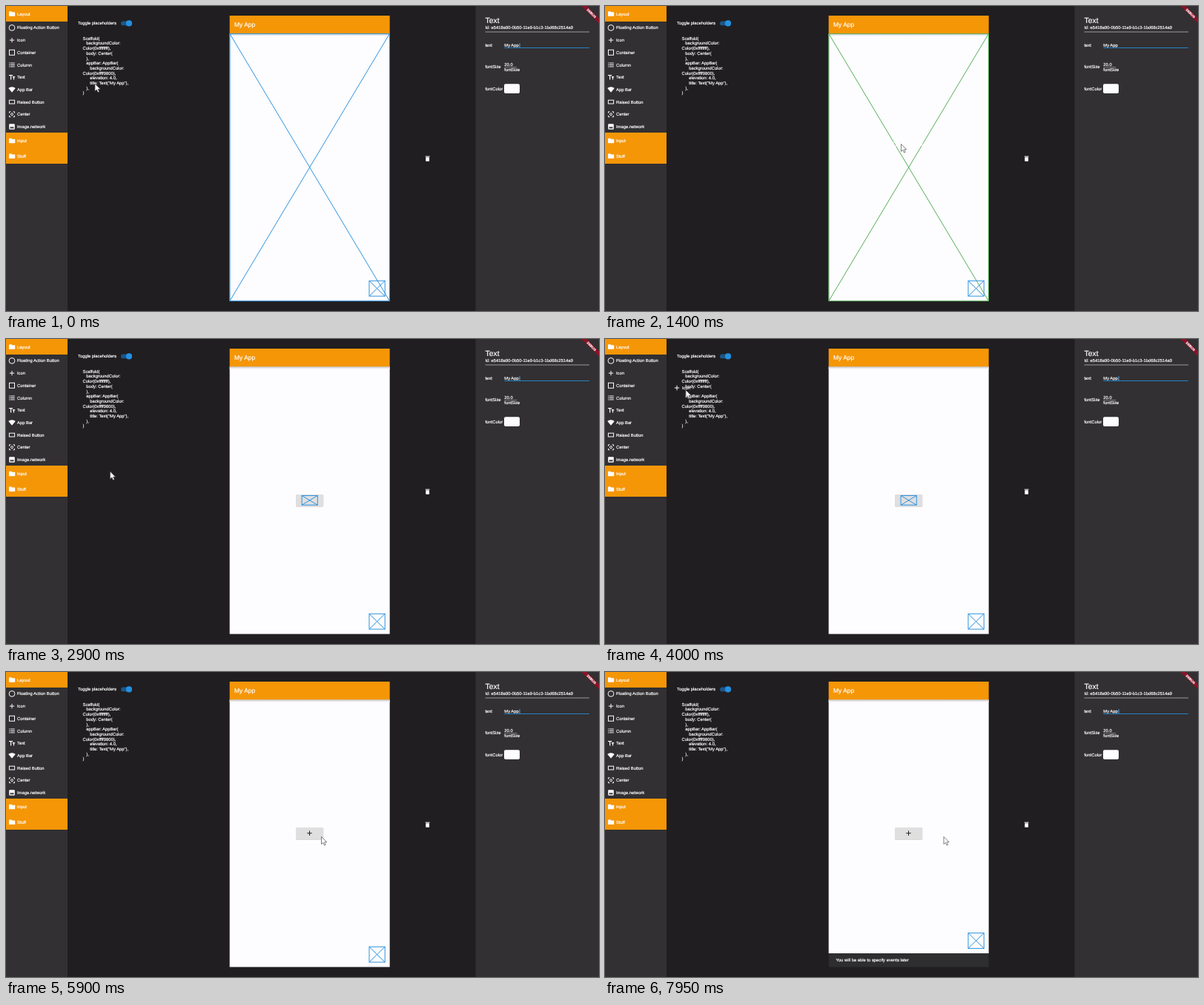
These frames come from a looping animation (800x412 px, 8000 ms). An HTML page with a canvas:

```html
<!DOCTYPE html>
<html lang="en">
<head>
<meta charset="utf-8">
<title>App builder</title>
<style>
  html, body { margin: 0; height: 100%; overflow: hidden; background: #201e20; }
  canvas { display: block; }
</style>
</head>
<body>
<canvas id="stage" width="800" height="412"></canvas>
<script>
const c = document.getElementById('stage').getContext('2d');
const LOOP = 8000, TICK = 50, BLINK = 495;
const WHITE = '#fdfcfe', PANEL = '#323032', BACK = '#201e20', ORANGE = '#f59607',
      BLUE = '#2b93e0', GREEN = '#55ae59', GREY = '#9a989a', SNACK = '#2e2d2f';
const PHONE = { left: 301.7, right: 517.7, top: 13, body: 37.3, bottom: 398.6 };
const MID = { x: (PHONE.left + PHONE.right) / 2, y: (PHONE.body + PHONE.bottom) / 2 };

const ITEMS = [
  ['fab', 'Floating Action Button'], ['icon', 'Icon'], ['container', 'Container'],
  ['column', 'Column'], ['text', 'Text'], ['appBar', 'App Bar'],
  ['button', 'Raised Button'], ['center', 'Center'], ['image', 'Image.network']
];
const rowY = i => 29.4 + i * 16.7;

const CODE = `Scaffold(
   backgroundColor:
Color(0xffffffff),
   body: Center(
   ),
   appBar: AppBar(
      backgroundColor:
Color(0xffff9800),
      elevation: 4.0,
      title: Text("My App"),
   ),
)`.split('\n');

// Pointer moves: start, end, x, y, downward sag on the way
const START = { x: 120, y: 105 };
const MOVES = [
  [0, 850, 18, rowY(6), 165],
  [900, 1400, 399.5, 186.5],
  [1400, 1700, MID.x, MID.y],
  [2250, 2900, 140.5, 179, 45],
  [2900, 3100, 23, 69],
  [3250, 3500, 20, rowY(1) + 3],
  [3750, 4000, 109, 69],
  [4150, 4300, MID.x, MID.y + 10],
  [4450, 4700, MID.x, MID.y],
  [5250, 5900, 425.5, 222.5],
  [7400, 7950, 457, 222.5]
];
const BUTTON_DRAG = [900, 1750], ICON_DRAG = [3750, 4900];
const SNACK_START = 6450, SNACK_TIME = 300;

const progress = (t, from, to) => Math.max(0, Math.min(1, (t - from) / (to - from)));
const within = (t, [from, to]) => t >= from && t < to;

function pointerAt(t) {
  let { x, y } = START;
  for (const [from, to, toX, toY, sag = 0] of MOVES) {
    const p = progress(t, from, to), k = p * p * (3 - 2 * p);
    x += (toX - x) * k;
    y += (toY - y) * k + sag * Math.sin(Math.PI * k);
  }
  return { x, y };
}

function rect(x, y, w, h, fill, r = 0) {
  c.fillStyle = fill;
  c.beginPath();
  c.roundRect(x, y, w, h, r);
  c.fill();
}

function frameRect(x, y, w, h, color) {
  c.strokeStyle = color;
  c.lineWidth = 1;
  c.strokeRect(x, y, w, h);
}

function trace(points) {
  c.beginPath();
  points.forEach(([x, y]) => c.lineTo(x, y));
}

function line(points, color, width = 1) {
  trace(points);
  c.strokeStyle = color;
  c.lineWidth = width;
  c.stroke();
}

function shape(points, fill) {
  trace(points);
  c.closePath();
  c.fillStyle = fill;
  c.fill();
}

function circle(x, y, r, color, hollow) {
  c.beginPath();
  c.arc(x, y, r, 0, 7);
  c.fillStyle = c.strokeStyle = color;
  c.lineWidth = 1;
  hollow ? c.stroke() : c.fill();
}

function at(x, y, paint) {
  c.save();
  c.translate(x, y);
  paint();
  c.restore();
}

// y is the middle of the capitals; the hairline keeps small type bright
function text(str, x, y, size = 5.83, weight = '') {
  c.font = `${weight} ${size}px "Liberation Sans", Arial, sans-serif`;
  c.fillStyle = c.strokeStyle = '#fff';
  c.lineWidth = .18;
  c.fillText(str, x, y + size * .36);
  c.strokeText(str, x, y + size * .36);
}

function placeholder(x, y, w, h, color) {
  frameRect(x, y, w, h, color);
  line([[x, y], [x + w, y + h]], color);
  line([[x + w, y], [x, y + h]], color);
}

function plus(color) {
  rect(-3.2, -.5, 6.4, 1, color);
  rect(-.5, -3.2, 1, 6.4, color);
}

function letterT(x, y, size) {
  rect(x - size / 2, y, size, 1.2, WHITE);
  rect(x - .6, y, 1.2, 3.3 - y, WHITE);
}

// Icons are drawn around their own centre
const ICONS = {
  folder() {
    rect(-4, -3.2, 4, 3, WHITE, .6);
    rect(-4, -2.3, 8.2, 5.6, WHITE, .6);
  },
  fab() { circle(0, 0, 3.9, WHITE, true); },
  icon() { plus(WHITE); },
  container() { frameRect(-3.5, -3.5, 7, 7, WHITE); },
  column() {
    for (const y of [-2.4, 0, 2.4]) {
      rect(-4, y - .5, 1.2, 1, WHITE);
      rect(-2.2, y - .5, 6, 1, WHITE);
    }
  },
  text() {
    letterT(-1.4, -3.2, 5.2);
    letterT(2.5, -1, 3.4);
  },
  appBar() {
    c.fillStyle = WHITE;
    c.beginPath();
    c.moveTo(0, 3.8);
    c.arc(0, 3.8, 7.5, -Math.PI * .72, -Math.PI * .28);
    c.fill();
  },
  button() { frameRect(-3.6, -2.4, 7.2, 4.8, WHITE); },
  center() {
    circle(0, 0, 1.5, WHITE, true);
    for (const sx of [-1, 1]) for (const sy of [-1, 1])
      line([[sx * 3.5, sy * 1.6], [sx * 3.5, sy * 3.5], [sx * 1.6, sy * 3.5]], WHITE);
  },
  image() {
    rect(-3.8, -3.7, 7.6, 7.4, WHITE, .9);
    for (const x of [-1.2, 1.2]) shape([[x - 1.8, 2.2], [x, -.4], [x + 1.8, 2.2]], PANEL);
  }
};

function item(icon, label, x, y) {
  at(x, y, ICONS[icon]);
  text(label, x + 7, y);
}

function sidebar() {
  rect(0, 0, 83, 412, PANEL);
  rect(0, 0, 83, 21, ORANGE);
  rect(0, 171, 83, 42, ORANGE);
  item('folder', 'Layout', 8, 10.5);
  ITEMS.forEach(([icon, label], i) => item(icon, label, 8, rowY(i)));
  item('folder', 'Input', 8, 182);
  item('folder', 'Stuff', 8, 202.8);
}

function workspace() {
  text('Toggle placeholders', 97, 23.3);
  rect(155, 20.5, 14, 5.8, '#1c5688', 2.9);
  circle(166, 23.4, 4.1, '#2490e0');
  CODE.forEach((row, i) => text(row, 103.5, 43.7 + i * 6.7));
  at(568.7, 206, () => {
    rect(-2.4, -1.8, 4.8, 5.6, WHITE, .6);
    rect(-2.9, -3.3, 5.8, 1, WHITE);
  });
}

function inspector(caret) {
  const labelX = 646.5, valueX = 672.3;
  rect(633.5, 0, 166.5, 412, PANEL);
  text('Text', labelX, 19.3, 10.4);
  text('Id: e5418a90-0b50-11e9-b1c3-1bd68c2514a9', labelX, 28.5);
  rect(labelX, 34.6, 140.5, .8, GREY);
  ['text', 'fontSize', 'fontColor'].forEach((label, i) => text(label, labelX, 53 + i * 29.25));
  text('My App', valueX, 53.2);
  rect(valueX, 56, 114.5, 1, '#2783c8');
  if (caret) rect(692.5, 50.2, 1, 6, '#4aa6ea');
  text('20.0', valueX, 79);
  rect(valueX, 82.2, 17, .7, GREY);
  text('fontSize', valueX, 86);
  rect(672, 105.3, 21, 12.6, WHITE, 2);

  at(790, 10, () => {
    c.rotate(Math.PI / 4);
    rect(-17, -2.5, 34, 5, '#8c1228');
    c.textAlign = 'center';
    text('DEBUG', 0, 0, 4.4, 'bold');
  });
}

function snackbar(rise) {
  const { left, right, body, bottom } = PHONE;
  rect(left, bottom - rise, right - left, rise, SNACK);
  c.save();
  c.beginPath();
  c.rect(left, body, right - left, bottom - body);
  c.clip();
  text('You will be able to specify events later', 311.5, bottom - rise + 9.4);
  c.restore();
}

function phone(t, pointer) {
  const { left, right, top, body, bottom } = PHONE, w = right - left;
  const rise = 18.6 * (1 - (1 - progress(t, SNACK_START, SNACK_START + SNACK_TIME)) ** 3);
  const shadow = c.createLinearGradient(0, body, 0, body + 3.5);
  shadow.addColorStop(0, '#c6c5c7');
  shadow.addColorStop(1, WHITE);
  rect(left, body, w, bottom - rise - body, WHITE);
  rect(left, body, w, 3.5, shadow);
  rect(left, top, w, body - top, ORANGE);
  text('My App', 308, 25.2, 8.45);

  if (t < BUTTON_DRAG[1]) {
    const hover = t >= BUTTON_DRAG[0] && pointer.x > left;
    placeholder(left + .3, body + .3, w - .6, bottom - body - .6, hover ? GREEN : BLUE);
  } else {
    rect(MID.x - 18.5, MID.y - 7.5, 37, 16.3, '#cfced0', 1);
    rect(MID.x - 18.5, MID.y - 7.8, 37, 16, '#e0dfe0', 1);
    if (t < ICON_DRAG[1]) {
      const hover = t >= ICON_DRAG[0] && pointer.x > left && pointer.y < MID.y + 7;
      placeholder(MID.x - 10.6, MID.y - 6.4, 21.2, 12.7, hover ? GREEN : BLUE);
    } else {
      at(MID.x - .2, MID.y - .2, () => plus('#222'));
    }
  }
  placeholder(490, 371.2 - rise, 21.2, 20.8, BLUE);
  if (rise) snackbar(rise);
}

function arrow() {
  const outline = [[0, 0], [0, 10], [2.3, 7.9], [4, 11.6], [5.7, 10.8], [4.1, 7.3], [7.2, 7.3]];
  shape(outline, '#fff');
  line([...outline, outline[0]], '#4a484c', .7);
}

function draw(t) {
  const p = pointerAt(t);
  rect(0, 0, 800, 412, BACK);
  workspace();
  phone(t, p);
  sidebar();
  inspector(Math.floor((t - 315) / BLINK) % 2 !== 0);
  if (within(t, BUTTON_DRAG)) item('button', 'Raised Button', p.x - 10, p.y);
  if (within(t, ICON_DRAG)) item('icon', 'Icon', p.x - 12, p.y - 3);
  at(p.x, p.y, arrow);
}

c.textRendering = 'geometricPrecision';
const start = performance.now();
function frame() {
  const t = (performance.now() - start) % LOOP;
  draw(Math.floor(t / TICK) * TICK);
  requestAnimationFrame(frame);
}
frame();
</script>
</body>
</html>
```
